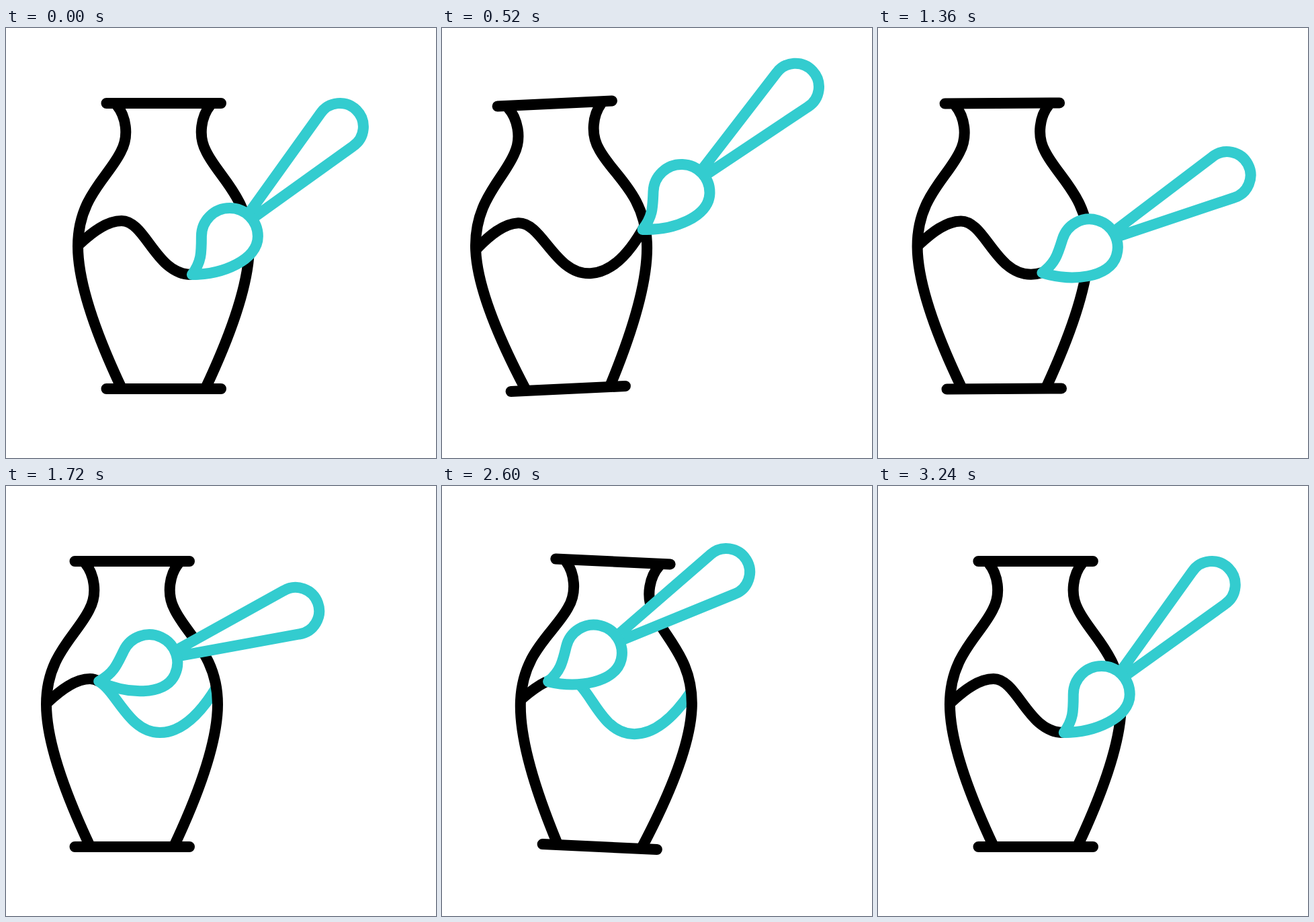
Animation, 640 px wide and 640 px high, one loop 3280 ms. Source, as an HTML page:

```html
<!DOCTYPE html>
<html lang="en">
<head>
<meta charset="utf-8">
<title>Vase painting</title>
<style>
  html, body { margin: 0; width: 100%; height: 100%; overflow: hidden; background: #fff; }
  svg { display: block; width: 100%; height: 100%; }
  svg * { fill: none; stroke-width: 16; stroke-linejoin: round; }
  .ink { stroke: #000; }
  .teal { stroke: #33cccf; }
  .round { stroke-linecap: round; }
  .solid { fill: #fff; }
</style>
</head>
<body>
<svg viewBox="0 0 640 640">
  <defs>
    <path id="side" d="M165 115C178 131 184 160 171 184C152 223 107 252 107 325C107 387 141 470 171 534"/>
    <path id="wave" d="M109 322C128 304 150 287 172 287C208 287 223 367 276 367C307 367 335 341 360 300"/>
  </defs>
  <g id="vase">
    <use href="#wave" id="fresh" class="teal"/>
    <use href="#wave" id="painted" class="ink"/>
    <use href="#side" class="ink"/>
    <use href="#side" class="ink" transform="translate(469) scale(-1 1)"/>
    <path class="ink round" d="M149.500 112H320M149.500 537H320"/>
  </g>
  <g id="brush">
    <path class="teal solid" d="M365 271L468 127.400A35 35 0 1 1 516.600 176L373 279Z"/>
    <path class="teal solid" d="M277 367C291 348 291 335 291 310A42 42 0 0 1 375 310C375 345 323 367 277 367Z"/>
  </g>
</svg>
<script>
const LOOP = 3280, STEP = 40;
const BASE = { x: 234.5, y: 537 }, TIP = { x: 277, y: 367 };
const VALLEY = 0.655;    // share of the wave painted when the loop starts
const BRUSH_SWAY = 1.3;  // the brush sways a little further than the vase

const el = id => document.getElementById(id);
const wave = el('wave'), vase = el('vase'), brush = el('brush');
const painted = el('painted'), fresh = el('fresh');
const waveLength = wave.getTotalLength();

// Sine ease from 0 to 1 between two times.
function ease(t, from, to) {
  const u = Math.min(1, Math.max(0, (t - from) / (to - from)));
  return (1 - Math.cos(Math.PI * u)) / 2;
}

// Rocking from rest through evenly spaced peaks and back to rest.
function rock(t, start, step, peaks) {
  let angle = 0;
  [...peaks, 0].forEach((peak, i) => {
    angle += (peak - (peaks[i - 1] || 0)) * ease(t, start + i * step, start + (i + 1) * step);
  });
  return angle;
}

function draw(t) {
  const shift = 47 * (ease(t, 1840, 2320) - ease(t, 40, 500));
  const tilt = rock(t, -120, 360, [3.4, -3.5, 1.8, -0.4]) * Math.min(1, t / 240)
    + rock(t, 1900, 340, [-3.4, 2.7, -2.3]);
  const stroke = VALLEY + (1 - VALLEY) * ease(t, 0, 520) - ease(t, 900, 2160)
    + VALLEY * ease(t, 2320, 3250);
  const turn = 2 * ease(t, 0, 560) + 23.3 * ease(t, 900, 1670) - 25.3 * ease(t, 2080, 3160);

  const done = stroke * waveLength;
  vase.setAttribute('transform', `translate(${shift}) rotate(${tilt} ${BASE.x} ${BASE.y})`);
  painted.setAttribute('stroke-dasharray', `${done} 999`);
  fresh.setAttribute('stroke-dasharray', `0 ${done} 999`);

  // The tip follows the wave; only the left side dips as the vase rocks.
  const point = wave.getPointAtLength(done);
  const sin = Math.sin(tilt * Math.PI / 180);
  const dx = point.x - BASE.x, dy = point.y - BASE.y;
  const x = point.x + shift - dy * sin * BRUSH_SWAY;
  const y = point.y + Math.min(dx, 0) * sin;
  brush.setAttribute('transform',
    `translate(${x} ${y}) rotate(${turn}) translate(${-TIP.x} ${-TIP.y})`);
}

const start = performance.now();
function frame() {
  const t = (performance.now() - start) % LOOP;
  draw(Math.floor(t / STEP) * STEP);
  requestAnimationFrame(frame);
}
frame();
</script>
</body>
</html>
```
